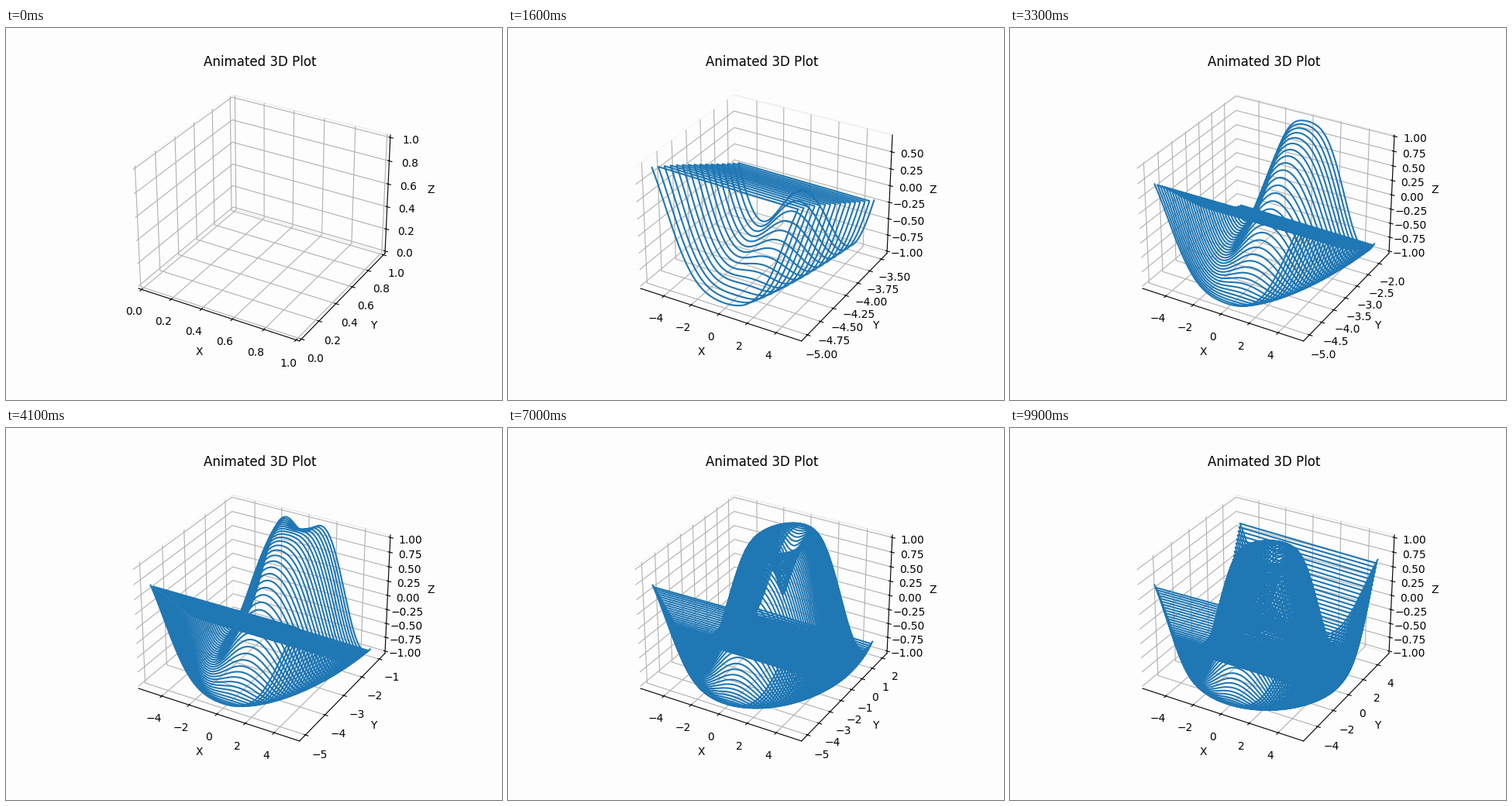
A matplotlib script that plays this animation: 640x480 px, repeating every 10 s.

```python
import numpy as np
import matplotlib.pyplot as plt
from matplotlib.animation import FuncAnimation

ROWS = 100
PAPER = "#fdfdfd"

span = np.linspace(-5, 5, ROWS)
X, Y = np.meshgrid(span, span)
Z = np.sin(np.hypot(X, Y))

fig = plt.figure(figsize=(6.4, 4.8), dpi=100, facecolor=PAPER)
ax = fig.add_subplot(projection="3d", facecolor=PAPER)


def style_panes():
    """Panes blend into the paper, only their outlines stay faintly visible."""
    for axis, grey in ((ax.xaxis, 0.965), (ax.yaxis, 0.925), (ax.zaxis, 0.945)):
        axis.pane.set_alpha(1)
        axis.pane.set_facecolor(PAPER)
        axis.pane.set_edgecolor((grey, grey, grey))


def draw(rows):
    """Trace the first rows of the surface as one continuous line."""
    ax.clear()
    style_panes()
    if rows:
        ax.plot(X[:rows].ravel(), Y[:rows].ravel(), Z[:rows].ravel())
    else:
        for set_lim in (ax.set_xlim, ax.set_ylim, ax.set_zlim):
            set_lim(0, 1, view_margin=1 / 48)
    ax.set_title("Animated 3D Plot")
    ax.set_xlabel("X")
    ax.set_ylabel("Y")
    ax.set_zlabel("Z")


anim = FuncAnimation(fig, draw, frames=ROWS, interval=100,
                     init_func=lambda: draw(0), repeat=True, repeat_delay=0)
plt.show()
```
